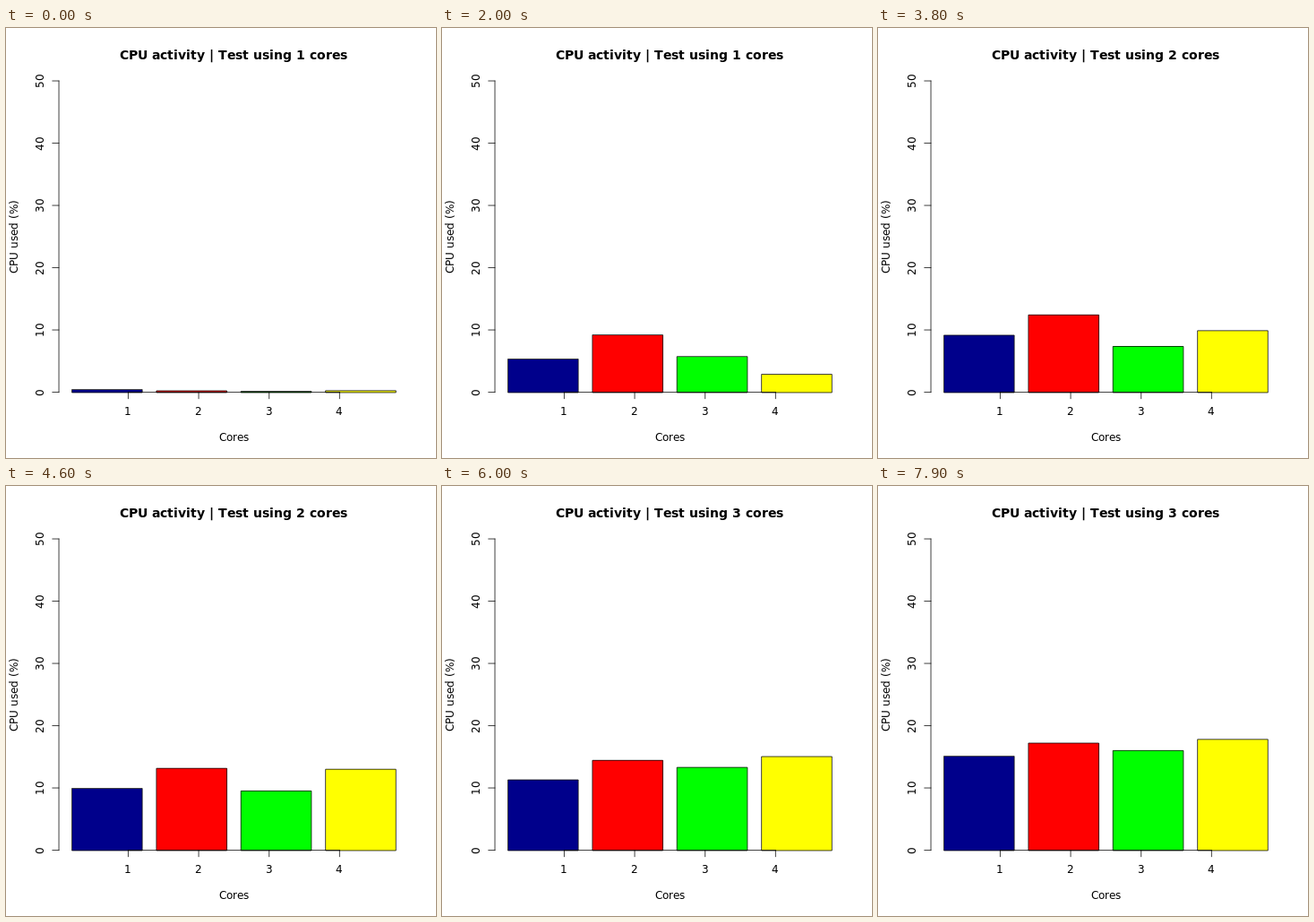
Animation, 480 px wide and 480 px high, one loop 8 s. Source, as an HTML page:

```html
<!DOCTYPE html>
<html lang="en">
<head>
<meta charset="utf-8">
<title>CPU activity</title>
<style>
  html, body { margin: 0; width: 100%; height: 100%; overflow: hidden; background: #fff; }
  svg { display: block; width: 480px; height: 480px; }
  path { fill: none; stroke: #000; stroke-width: 0.75; stroke-linecap: round; stroke-linejoin: round; }
  rect { shape-rendering: crispEdges; }
</style>
</head>
<body>
<svg id="chart" viewBox="0 0 480 480"></svg>
<script>
const LOOP = 8000, STEP = 100, CORE_TIME = 2900;
const LEFT = 59.04, TOP = 59.04, BASE = 406.56, MID_X = 254.4, MID_Y = 232.8;
const UNIT = 390.72 / 4.968;
const PLAIN = '12px "DejaVu Sans", sans-serif';
const BOLD = 'bold 14px "DejaVu Sans", sans-serif';
const px = x => LEFT + (x - 0.016) * UNIT;
const py = v => BASE - v * (BASE - TOP) / 50;

// Load of each core: the turning points as [seconds, percent].
const bars = [
  { fill: '#00008b', load: [[0, 0.43], [2, 5.33], [3.8, 9.15], [6, 11.3], [7.9, 15.1]] },
  { fill: '#ff0000', load: [[0, 0.23], [0.9, 5.77], [2.7, 11.4], [6, 14.43], [7.9, 17.2]] },
  { fill: '#00ff00', load: [[0, 0.15], [0.9, 4.75], [3.8, 7.35], [6, 13.3], [7.9, 16]] },
  { fill: '#ffff00', load: [[0, 0.25], [1.8, 0.5], [2, 2.88], [4.6, 13], [7.9, 17.8]] }
];

const chart = document.getElementById('chart');
const pen = document.createElement('canvas').getContext('2d');

function add(tag, attrs) {
  const el = document.createElementNS('http://www.w3.org/2000/svg', tag);
  for (const key in attrs) el.setAttribute(key, attrs[key]);
  return chart.appendChild(el);
}

// Centres text around a point, with every glyph on a whole pixel.
function setText(el, center, text) {
  pen.font = el.style.font;
  const widths = [...text].map(ch => Math.round(pen.measureText(ch).width));
  let x = Math.round(center - widths.reduce((a, b) => a + b) / 2);
  el.setAttribute('x', widths.map(w => (x += w) - w).join(' '));
  el.textContent = text;
}

function label(center, y, text, font = PLAIN) {
  const el = add('text', { y });
  el.style.font = font;
  setText(el, center, text);
  return el;
}

function sideLabel(x, center, text) {
  label(-center, x, text).setAttribute('transform', 'rotate(-90)');
}

function valueAt(points, t) {
  const i = Math.max(1, points.findIndex(p => p[0] >= t));
  const [t0, a] = points[i - 1], [t1, b] = points[i];
  return a + (b - a) * (t - t0) / (t1 - t0);
}

bars.forEach((bar, i) => {
  bar.x = px(0.2 + 1.2 * i);
  bar.body = add('rect', { x: bar.x, width: UNIT, fill: bar.fill });
  bar.edge = add('path');
});

add('path', { d: `M${px(1)} ${BASE}H${px(4)}` });
add('path', { d: `M${LEFT} ${BASE}V${TOP}` });
for (let n = 1; n <= 4; n++) {
  add('path', { d: `M${px(n)} ${BASE}v7.2` });
  label(px(n), 432, String(n));
}
for (let v = 0; v <= 50; v += 10) {
  add('path', { d: `M${LEFT} ${py(v)}h-7.2` });
  sideLabel(42, py(v), String(v));
}
label(MID_X, 461, 'Cores');
sideLabel(13, MID_Y, 'CPU used (%)');
const title = label(MID_X, 35, ' ', BOLD);

function draw(time) {
  const t = Math.floor((time % LOOP) / STEP) * STEP;
  for (const bar of bars) {
    const y = py(valueAt(bar.load, t / 1000));
    bar.body.setAttribute('y', y);
    bar.body.setAttribute('height', BASE - y);
    bar.edge.setAttribute('d', `M${bar.x} ${BASE}V${y}h${UNIT}V${BASE}z`);
  }
  const cores = 1 + Math.floor(t / CORE_TIME);
  setText(title, MID_X, `CPU activity | Test using ${cores} cores`);
}

const start = performance.now();
function tick() {
  draw(performance.now() - start);
  requestAnimationFrame(tick);
}
draw(0);
requestAnimationFrame(tick);
</script>
</body>
</html>
```
